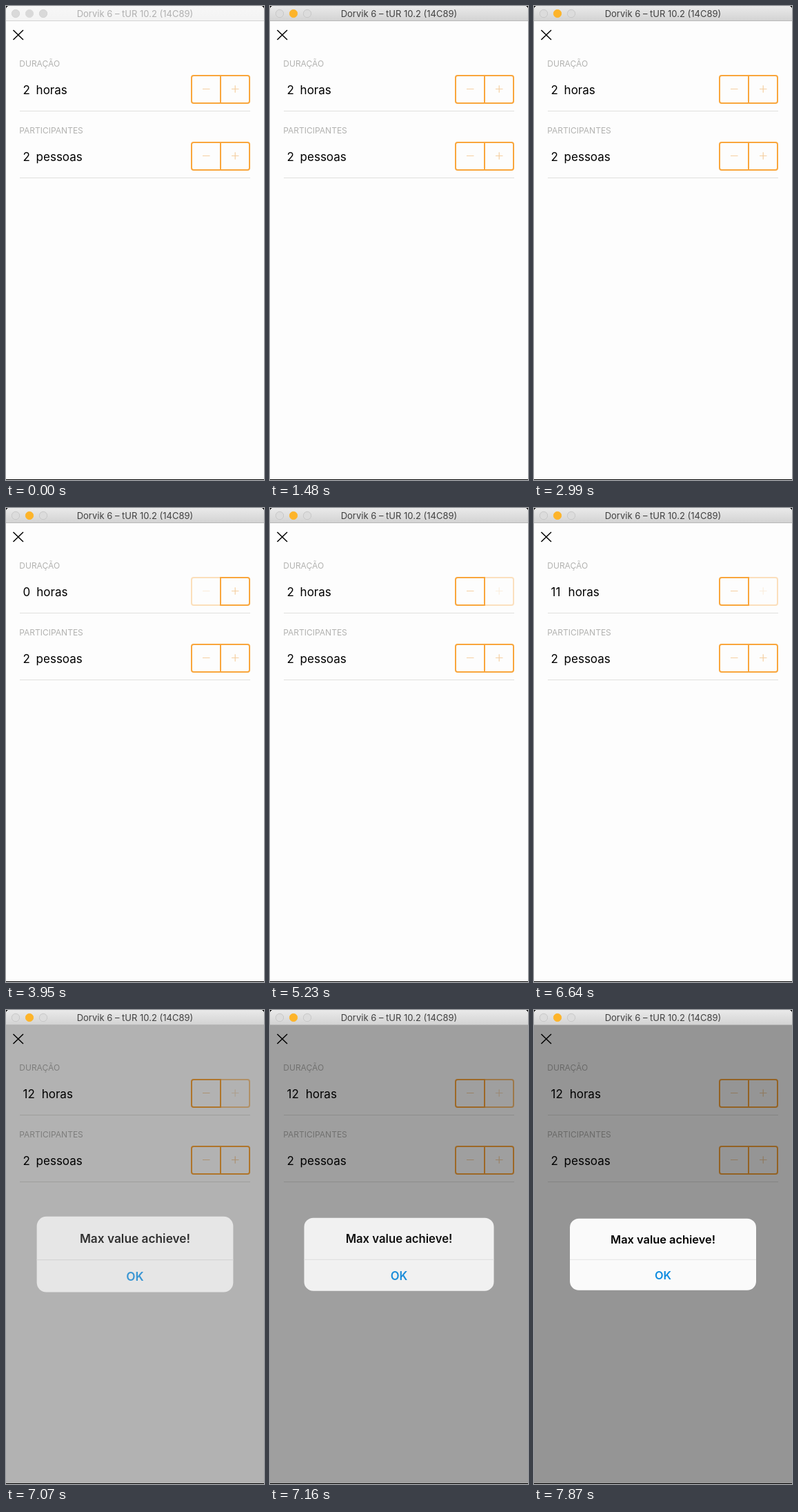
Recreate the animation shown at these times as an HTML page. Size 374 by 688 pixels, loop 8000 ms.

```html
<!DOCTYPE html>
<html lang="pt">
<head>
<meta charset="utf-8">
<title>Stepper</title>
<style>
html, body { margin: 0; width: 100%; height: 100%; overflow: hidden; background: #000; }
svg { display: block; font-family: Inter, Roboto, sans-serif; }
.label { font-size: 12px; fill: #b2b2b0; }
.value { font-size: 17px; fill: #000; }
.box { fill: none; stroke: #f9a63c; stroke-width: 2; }
.sign { fill: none; stroke: #f5cfa0; stroke-width: 1.2; }
.bold { font-size: 16.4px; font-weight: 600; text-anchor: middle; }
.title { font-size: 13px; text-anchor: middle; }
</style>
</head>
<body>
<svg width="374" height="688" viewBox="0 0 374 688">
  <defs>
    <linearGradient id="idle" x2="0" y2="1"><stop stop-color="#f7f7f7"/><stop offset="1" stop-color="#f3f3f3"/></linearGradient>
    <linearGradient id="live" x2="0" y2="1"><stop stop-color="#eaeaea"/><stop offset="1" stop-color="#d2d2d2"/></linearGradient>
    <clipPath id="win"><path d="M0 687V5a5 5 0 0 1 5-5H369a5 5 0 0 1 5 5V687Z"/></clipPath>
  </defs>
  <rect width="374" height="688"/>
  <g clip-path="url(#win)">
    <rect width="374" height="688" fill="#fdfdfd"/>
    <path d="M10.5 35L25 49M25 35L10.5 49" stroke="#000" stroke-width="1.5"/>
    <g id="rows"></g>
    <rect id="shade" y="22" width="374" height="666"/>
    <g id="alert">
      <rect x="-135" y="-52" width="270" height="104" rx="13" fill="#fafafa"/>
      <path d="M-135 7.5H135" stroke="#e2e2e2"/>
      <text class="bold" y="-16" fill="#000">Max value achieve!</text>
      <text class="bold" y="36.5" fill="#0f8ce0">OK</text>
    </g>
    <g id="bar"></g>
  </g>
</svg>
<script>
const LOOP = 8000, ALERT = 6906, TAP = 156;
const $ = id => document.getElementById(id);

function row(id, y, label, unit) {
  const button = (name, edge, sign) => {
    const s = Math.sign(edge - 311), sweep = s > 0 ? 1 : 0;
    return `<g id="${id}${name}">
      <path class="box" d="M311 ${y + 18}H${edge - 3 * s}a3 3 0 0 ${sweep} ${3 * s} 3v34a3 3 0 0 ${sweep} ${-3 * s} 3H311"/>
      <path class="sign" d="${sign}"/></g>`;
  };
  return `<text class="label" x="19.3" y="${y + 5}">${label}</text>
    <text class="value" id="${id}Num" x="24.5" y="${y + 45.4}">2</text>
    <text class="value" id="${id}Unit" x="43.6" y="${y + 45.4}">${unit}</text>
    <path d="M20 ${y + 69.5}H354" stroke="#e0e0de"/>
    ${button("Minus", 269, `M285 ${y + 37.5}h10.5`)}
    ${button("Plus", 353, `M327 ${y + 37.5}h10.5M332.2 ${y + 32.2}v10.5`)}
    <path class="box" d="M311 ${y + 17}V${y + 59}"/>`;
}

function titleBar(id, gray, ring, middle, ink, edge) {
  const light = (x, fill, stroke) =>
    `<circle cx="${x}" cy="11" r="5.7" fill="${fill}" stroke="${stroke}" stroke-width=".8"/>`;
  return `<g id="${id}Bar"><rect width="374" height="22" fill="url(#${id})"/>
    <path d="M0 21.5H374" stroke="${edge}"/>
    ${light(14, gray, ring)}${light(34, middle, middle)}${light(54, gray, ring)}
    <text class="title" x="187" y="16" fill="${ink}">Dorvik 6 – tUR 10.2 (14C89)</text></g>`;
}

$("rows").innerHTML = row("hours", 83, "DURAÇÃO", "horas") + row("people", 180, "PARTICIPANTES", "pessoas");
$("bar").innerHTML =
  titleBar("idle", "#d9d9d9", "#cfcfcf", "#d9d9d9", "#b0b0b0", "#d4d4d4") +
  titleBar("live", "#dcdcdc", "#c2c2c2", "#fdb42a", "#404040", "#b8b8b8");

// Each tap is [down, up, value change]; the last one passes the limit
const minus = [[3390, 3560, -1], [3740, 3900, -1]];
const plus = [[4340, 4500, 1]];
for (let i = 11; i >= 0; i--) {
  const up = ALERT - TAP * i;
  plus.push([up - 80, up, i ? 1 : 0]);
}

const clamp = v => Math.max(0, Math.min(1, v));
const count = (taps, t) => taps.reduce((n, [, up, step]) => t >= up ? n + step : n, 0);
const dim = (taps, t) => Math.max(...taps.map(([down, up]) =>
  Math.min(clamp((t - down) / 50), 1 - clamp((t - up) / 420))));
const unitX = n => n == 11 ? 49.6 : n > 9 ? 51.7 : n ? 43.6 : 44.3;

function draw(t) {
  const n = Math.min(12, 2 + count(minus, t) + count(plus, t));
  $("hoursNum").textContent = n;
  $("hoursUnit").setAttribute("x", unitX(n));
  $("hoursMinus").setAttribute("opacity", 1 - 0.75 * dim(minus, t));
  $("hoursPlus").setAttribute("opacity", 1 - 0.75 * dim(plus, t));
  $("liveBar").setAttribute("opacity", t < 140 ? 0 : clamp((t - 90) / 220));

  // Critically damped spring for the alert
  const w = Math.max(0, t - ALERT) * 0.0156;
  const rest = (1 + w) * Math.exp(-w);
  $("shade").setAttribute("opacity", 0.41 * (1 - rest));
  $("alert").setAttribute("opacity", 1 - rest);
  $("alert").setAttribute("transform", `translate(187 354.7) scale(${1 + 0.2 * rest})`);
}

function tick(now) {
  draw(now % LOOP);
  requestAnimationFrame(tick);
}
draw(0);
requestAnimationFrame(tick);
</script>
</body>
</html>
```
